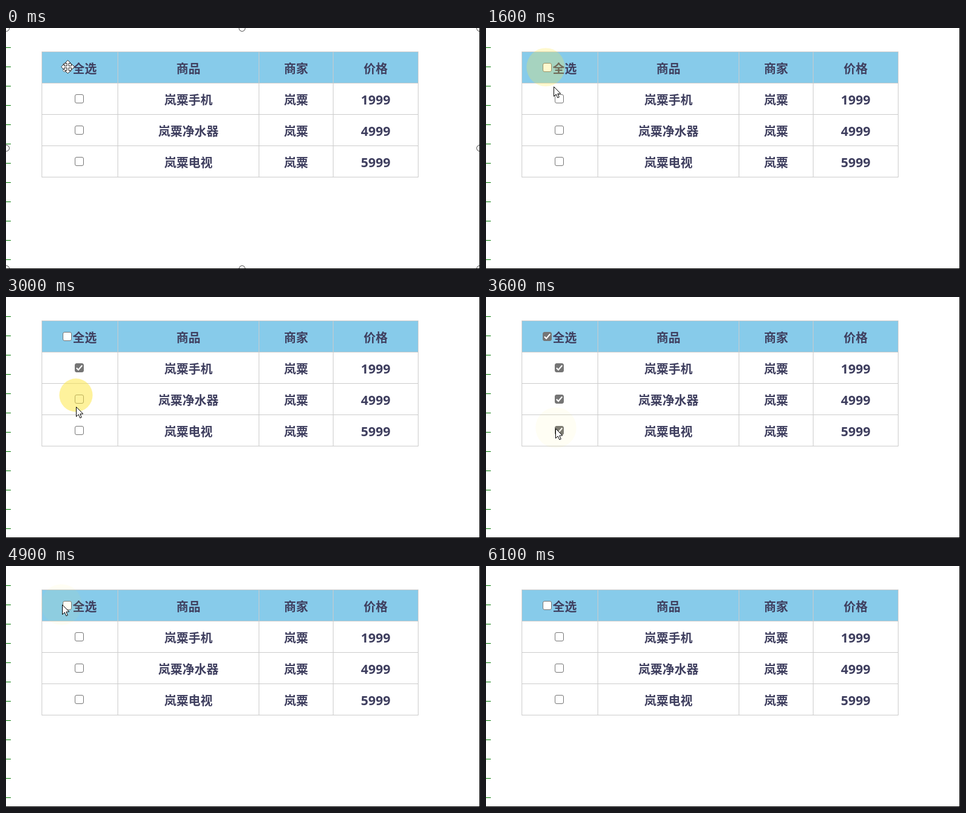
An HTML page with a canvas for the animation above (6.4 s loop, 786 by 400 pixels).

```html
<!DOCTYPE html>
<html lang="zh-CN">
<head>
<meta charset="utf-8">
<title>全选</title>
<style>
html, body { margin: 0; width: 100%; height: 100%; overflow: hidden; background: #fff; }
canvas { display: block; }
</style>
</head>
<body>
<canvas id="stage" width="786" height="400"></canvas>
<script>
const ctx = document.getElementById('stage').getContext('2d');
const LOOP = 6400, STEP = 100, HALO_LIFE = 335, RELEASE = 200;
const TOP = 39, ROW_HEIGHT = 52, HEADER = 0;
const COLS = [59, 185, 419, 542, 683];
const BRAND = '岚粟';
const CELLS = [
  ['商品', '商家', '价格'],
  ...['手机', '净水器', '电视'].map((item, i) => [BRAND + item, BRAND, `${[1, 4, 5][i]}999`])
];
// Where the pointer goes; a stop with a row clicks that row's checkbox
const STOPS = [
  { t: 850, x: 98, y: 65, row: HEADER },
  { t: 1350, x: 99, y: 65, row: HEADER },
  { t: 1790, x: 121, y: 119, row: 1 },
  { t: 2100, x: 121, y: 182 },
  { t: 2810, x: 116, y: 163, row: 2 },
  { t: 3290, x: 116, y: 217, row: 3 },
  { t: 3940, x: 113, y: 220, row: 3 },
  { t: 4240, x: 113, y: 220, row: 3 },
  { t: 4590, x: 92, y: 64, row: HEADER },
  { t: 5240, x: 94, y: 64, row: HEADER },
  { t: 5540, x: 94, y: 64, row: HEADER },
  { t: 5900, x: 174, y: 75 }
];
const CLICKS = STOPS.filter(stop => 'row' in stop);

function rect(x, y, w, h, color) {
  ctx.fillStyle = color;
  ctx.fillRect(x, y, w, h);
}

function poly(points, close = true) {
  ctx.beginPath();
  points.forEach(([x, y]) => ctx.lineTo(x, y));
  if (close) ctx.closePath();
}

function paint(fill, stroke, width = 1) {
  ctx.lineWidth = width;
  if (fill) { ctx.fillStyle = fill; ctx.fill(); }
  if (stroke) { ctx.strokeStyle = stroke; ctx.stroke(); }
}

function circle(x, y, r) {
  ctx.beginPath();
  ctx.arc(x, y, r, 0, Math.PI * 2);
}

function label(text, x, y) {
  const number = /^\d+$/.test(text);
  ctx.font = number
    ? 'bold 21.4px "Noto Sans", "Open Sans", sans-serif'
    : 'bold 20px "Noto Sans CJK SC", "Noto Sans CJK", sans-serif';
  ctx.fillStyle = '#3f3f5f';
  ctx.textAlign = 'center';
  ctx.fillText(text, x, y + 7.5);
}

function checkbox(x, y, on) {
  ctx.beginPath();
  ctx.roundRect(x - 7, y - 7, 14, 14, 2.5);
  paint(on ? '#757575' : '#fff', '#757575');
  if (!on) return;
  poly([[x - 4.6, y + .3], [x - 1.5, y + 3.5], [x + 4.8, y - 4]], false);
  paint(null, '#fff', 2.1);
}

// The header checkbox sets every row and follows them in turn
function checkedAt(t) {
  let on = Array(4).fill(false);
  for (const click of CLICKS) {
    if (click.t + RELEASE > t) break;
    if (click.row === HEADER) {
      on.fill(!on[HEADER]);
    } else {
      on[click.row] = !on[click.row];
      on[HEADER] = on.slice(1).every(Boolean);
    }
  }
  return on;
}

function table(t) {
  const height = CELLS.length * ROW_HEIGHT, width = COLS[4] - COLS[0] + 1;
  rect(COLS[0], TOP, width, ROW_HEIGHT, '#87cbea');
  COLS.forEach(x => rect(x, TOP, 1, height + 1, '#ccc'));
  for (let y = 0; y <= height; y += ROW_HEIGHT) rect(COLS[0], TOP + y, width, 1, '#ccc');

  const on = checkedAt(t);
  CELLS.forEach((cells, row) => {
    const y = TOP + row * ROW_HEIGHT + 28;
    cells.forEach((text, i) => label(text, (COLS[i + 1] + COLS[i + 2] + 1) / 2, y));
    checkbox(row === HEADER ? 101.5 : 121.5, y - 1.5, on[row]);
  });
  label('全选', 130.5, TOP + 28);
}

function halo(t, click) {
  const u = (t - click.t) / HALO_LIFE;
  if (u <= 0 || u >= 1) return;
  circle(click.x, click.y, 34 * (1 - (1 - u) ** 2));
  paint(`rgba(253, 230, 65, ${Math.min(.8, 1.55 * (1 - u) ** 1.3)})`);
}

function arrow(x, y) {
  ctx.save();
  ctx.translate(Math.round(x) + .5, Math.round(y) + .5);
  poly([[0, 0], [0, 16], [3.7, 12.5], [6.3, 18.3], [8.8, 17.2], [6.3, 11.6], [11.3, 11.4]]);
  paint('#fff', '#000');
  ctx.restore();
}

function moveIcon(x, y) {
  const arm = [[-1.5, -1.5], [-1.5, -6], [-5, -6], [0, -11], [5, -6], [1.5, -6]];
  const outline = [0, 1, 2, 3].flatMap(turn => arm.map(([px, py]) => {
    for (let i = 0; i < turn; i++) [px, py] = [-py, px];
    return [x + px, y + py];
  }));
  poly(outline);
  paint('#fff', '#222');
}

function pointer(t) {
  const next = STOPS.findIndex(stop => stop.t >= t);
  if (next < 0) return;
  const b = STOPS[next], a = STOPS[Math.max(0, next - 1)];
  const u = a === b ? 1 : (t - a.t) / (b.t - a.t);
  const k = u * u * (3 - 2 * u);
  arrow(a.x + (b.x - a.x) * k, a.y + (b.y - a.y) * k);
}

function handles() {
  for (const x of [0, 391, 785]) for (const y of [0, 199, 399]) {
    if (x === 391 && y === 199) continue;
    circle(x + .5, y + .5, 5);
    paint('#fff', '#444');
  }
}

function draw(t) {
  const selecting = t < STEP;
  rect(0, 0, 786, 400, '#fff');
  for (let y = 32; y < 400; y += 32) rect(0, y, 8, 1, '#007800');
  if (selecting) handles();
  rect(785, 0, 1, 400, '#000');
  rect(0, 399, 786, 1, '#000');
  table(t);
  CLICKS.forEach(click => halo(t, click));
  if (selecting) moveIcon(102.5, 64.5);
  else pointer(t);
}

const begin = performance.now();
function tick() {
  const t = (performance.now() - begin) % LOOP;
  draw(Math.floor(t / STEP) * STEP);
  requestAnimationFrame(tick);
}
tick();
</script>
</body>
</html>
```
